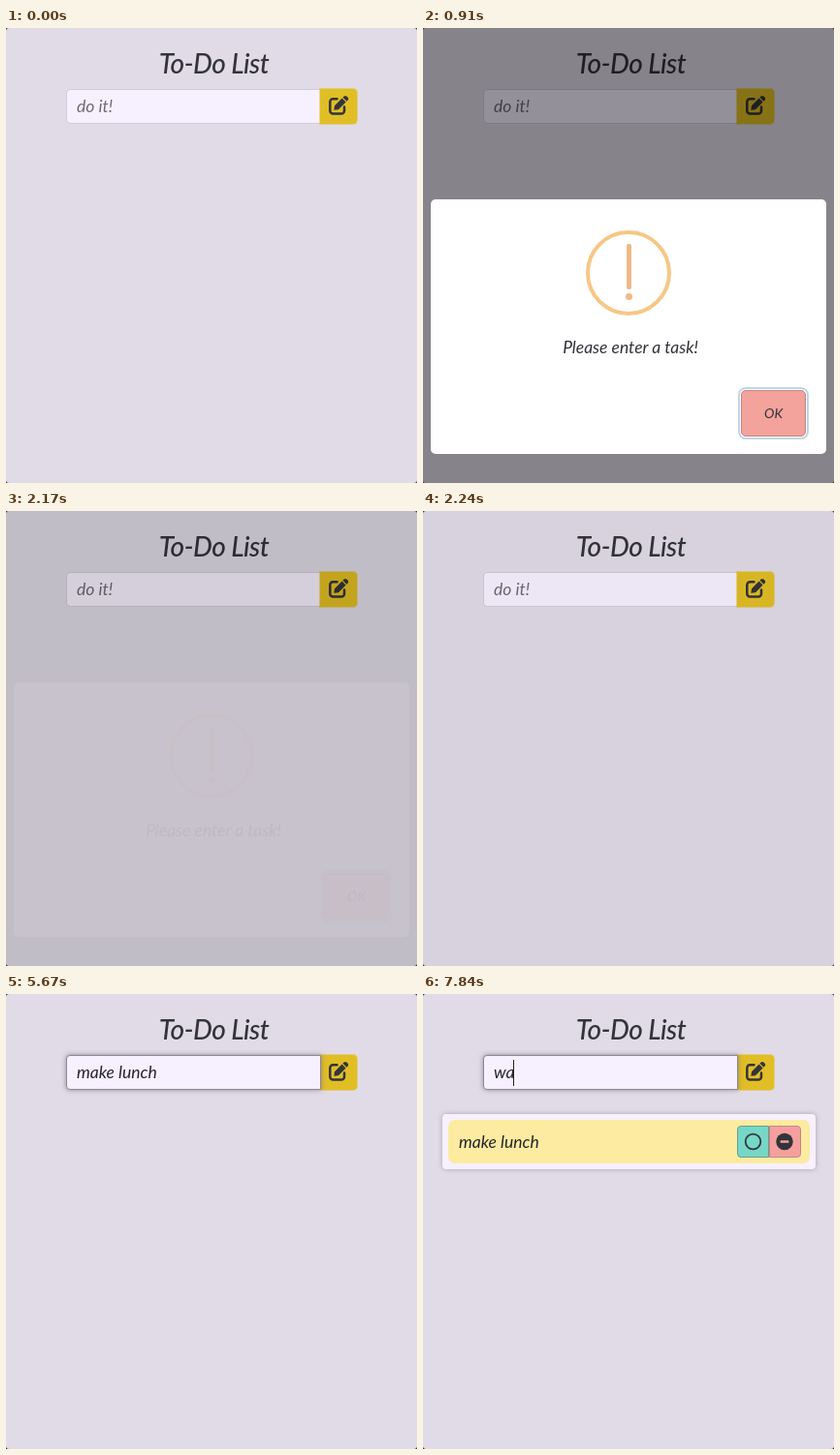
Animation, 424 px wide and 470 px high, one loop 8 s. Source, as an HTML page:

```html
<!DOCTYPE html>
<html lang="en">
<head>
<meta charset="utf-8">
<title>To-Do List</title>
<style>
  html, body { margin: 0; width: 100%; height: 100%; overflow: hidden; background: #2b292e; }
  #stage {
    position: relative; width: 424px; height: 470px; overflow: hidden;
    border-radius: 3px; background: #e0dbe6; color: #33343b;
    font: italic 17.5px/36px Lato, sans-serif;
  }
  #stage div { position: absolute; box-sizing: border-box; }
  svg { position: absolute; left: 0; top: 0; overflow: visible; }

  #title {
    left: 0; top: 18px; width: 429px; text-align: center;
    font-size: 28px; font-weight: 500; letter-spacing: -.5px;
  }
  #add {
    left: 324px; top: 63px; width: 38px; height: 36px; z-index: 1;
    border-radius: 0 4px 4px 0; box-shadow: 0 0 0 1px rgba(225, 190, 37, .5);
  }
  #field {
    left: 62px; top: 63px; width: 263px; height: 36px; border: 1px solid; border-radius: 4px 0 0 4px;
    background: #f7f0ff; color: #25252a; padding-left: 10px; display: flex; align-items: center;
  }
  #hint { left: 10px; top: -1px; color: #6d6974; }
  #typed { white-space: pre; }
  #caret { width: 1px; height: 27px; margin-left: -1px; background: #222; }

  #card {
    left: 20px; top: 124px; width: 385px; height: 57px; border-radius: 4px;
    background: #f7f0ff; box-shadow: 0 0 5px #aaa2b4;
  }
  #task {
    left: 6px; top: 6px; width: 373px; height: 45px; padding-left: 11px;
    border-radius: 7px; background: #fdeba1; color: #25252a; line-height: 46px;
  }
  .tool { top: 12px; width: 33px; height: 33px; border: 1px solid; }
  #done { left: 304px; border-color: #6a9d90; border-radius: 4px 0 0 4px; background: #76d7c7; }
  #drop { left: 337px; border-color: #c58583; border-radius: 0 4px 4px 0; background: #f5a09e; }

  #overlay { left: 0; top: 0; width: 424px; height: 470px; z-index: 3; background: rgba(0, 0, 0, .4); }
  #modal { left: 8px; top: 177px; width: 408px; height: 263px; border-radius: 5px; background: #fff; }
  #ring { left: 160px; top: 31.5px; width: 88px; height: 88px; border: 4px solid; border-radius: 50%; }
  #bar { left: 201.5px; top: 45.5px; width: 5px; height: 47px; border-radius: 2px; background: #f0b987; }
  #dot { left: 200.5px; top: 96.5px; width: 7px; height: 7px; border-radius: 50%; background: #f0b987; }
  #note { left: 0; top: 135px; width: 412px; text-align: center; color: #303038; }
  #ok {
    left: 320px; top: 197px; width: 67px; height: 48px; border: 1px solid #c08583; border-radius: 5px;
    background: #f4a29c; box-shadow: 0 0 0 1px #fff, 0 0 0 3px rgba(43, 114, 165, .29);
    text-align: center; font-size: 14px; line-height: 46px;
  }
</style>
</head>
<body>
<div id="stage">
  <div id="title">To-Do List</div>
  <div id="add">
    <svg width="38" height="36">
      <path d="M17.5 10.2H13.3a3 3 0 0 0-3 3V22.500a3 3 0 0 0 3 3H22a3 3 0 0 0 3-3V18.500"
            fill="none" stroke="currentColor" stroke-width="2.500" stroke-linecap="round"/>
      <path d="M14.300 21.700l.7-4.500L22.600 9.600l4 4L19 21.200zM23.500 8.700l1.200-1.200q1.400-1.200 2.700 0l1.300 1.300q1.200 1.300 0 2.700L27.500 12.700z"
            fill="currentColor"/>
    </svg>
  </div>
  <div id="field">
    <div id="hint">do it!</div>
    <span id="typed"></span><span id="caret"></span>
  </div>

  <div id="card">
    <div id="task">make lunch</div>
    <div id="done" class="tool">
      <svg width="31" height="31"><circle cx="15.500" cy="15.500" r="7.800" fill="none" stroke="#33373b" stroke-width="1.800"/></svg>
    </div>
    <div id="drop" class="tool">
      <svg width="31" height="31">
        <circle cx="15" cy="15.500" r="8.700" fill="#33343b"/>
        <rect x="10.500" y="14.300" width="9" height="2.400" rx="1" fill="#f5a09e"/>
      </svg>
    </div>
  </div>

  <div id="overlay">
    <div id="modal">
      <div id="ring"></div><div id="bar"></div><div id="dot"></div>
      <div id="note">Please enter a task!</div>
      <div id="ok">OK</div>
    </div>
  </div>
</div>

<script>
  const LOOP = 8000, TICK = 70;
  const $ = id => document.getElementById(id);
  const tracks = [];

  // Steps are [time, properties, easing to the next step]; both ends hold.
  function track(id, steps) {
    const key = ([at, props, easing = 'linear']) => ({ offset: at / LOOP, easing, ...props });
    const first = steps[0], last = steps[steps.length - 1];
    const keys = [[0, first[1]], ...steps, [LOOP, last[1]]].map(key);
    const motion = $(id).animate(keys, { duration: LOOP, fill: 'both' });
    motion.pause();
    tracks.push(motion);
  }

  const idle = { color: '#33343b', backgroundColor: '#e1be25' };
  const hover = { color: '#f7f0ff', backgroundColor: '#d6b61e' };
  const blurred = { zIndex: 0, borderColor: '#d2cbd9', boxShadow: '0 0 0 rgba(122, 114, 136, 0)' };
  const focused = { zIndex: 2, borderColor: '#8f8799', boxShadow: '0 0 5px rgba(122, 114, 136, .8)' };
  const hidden = { opacity: 0 }, shown = { opacity: 1 };
  const scale = s => ({ transform: `scale(${s})` });
  const pale = { borderColor: '#f3d586' }, warm = { borderColor: '#f8bb86' };

  track('add', [
    [10, idle], [140, hover], [700, hover], [850, idle],
    [5960, idle], [6090, hover], [6800, hover], [7000, idle]
  ]);
  track('field', [
    [2610, blurred, 'ease'], [2860, focused], [6330, focused, 'ease'],
    [6580, blurred], [7300, blurred, 'ease'], [7550, focused]
  ]);
  track('card', [[6710, hidden, 'ease'], [7000, shown]]);
  track('overlay', [[565, hidden, 'ease'], [865, shown], [2055, shown, 'ease'], [2355, hidden]]);
  track('modal', [
    [565, { ...scale(1), ...shown }], [568, { ...scale(.5), ...shown }, 'ease'],
    [700, { ...scale(1.05), ...shown }, 'ease'], [805, { ...scale(.95), ...shown }, 'ease'],
    [865, { ...scale(1), ...shown }], [2055, { ...scale(1), ...shown }, 'ease'],
    [2255, { ...scale(1), ...hidden }]
  ]);
  track('ring', [[565, pale], [1190, warm], [1470, warm], [2030, pale]]);

  const typing = [
    [0, ''], [3710, 'm'], [3780, 'ma'], [4130, 'mak'], [4340, 'make'], [4410, 'make '],
    [4480, 'make l'], [4620, 'make lu'], [4760, 'make lun'], [5040, 'make lunc'],
    [5180, 'make lunch'], [6720, ''], [7770, 'w'], [7840, 'wa']
  ];
  const caretOn = [[2660, 3220], [3710, 5670], [6230, 6370], [7350, LOOP]];

  function draw(time) {
    const t = Math.floor(time / TICK) * TICK;
    for (const motion of tracks) motion.currentTime = t;
    const text = typing.filter(([at]) => at <= t).pop()[1];
    $('typed').textContent = text;
    $('hint').style.visibility = text ? 'hidden' : 'visible';
    const lit = caretOn.some(([from, to]) => t >= from && t < to);
    $('caret').style.visibility = lit ? 'visible' : 'hidden';
  }

  const start = performance.now();
  function loop() {
    draw((performance.now() - start) % LOOP);
    requestAnimationFrame(loop);
  }
  loop();
</script>
</body>
</html>
```
